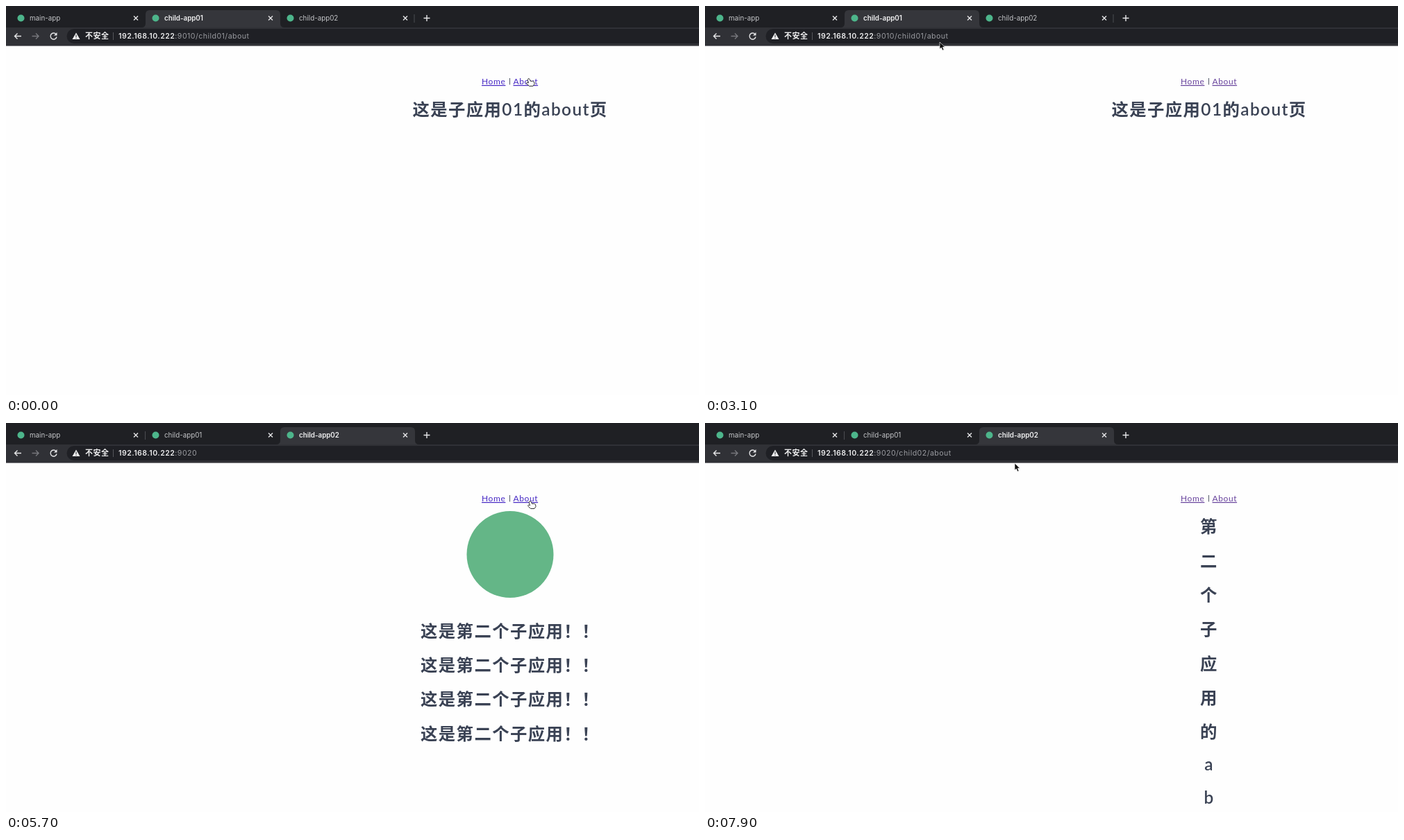
Write an HTML page that moves like this. It is 998 px wide and 561 px high and loops after 8000 ms.

```html
<!DOCTYPE html>
<html lang="zh-CN">
<head>
<meta charset="utf-8">
<title>Child apps</title>
<style>
html, body { margin: 0; width: 100%; height: 100%; overflow: hidden; background: #fefefe; }
svg { display: block; width: 100%; height: 100%; font-family: Inter, "Noto Sans CJK SC", "Noto Sans CJK", sans-serif; }

.title { font-size: 9.8px; fill: #c3c4c7; }
.title.on { fill: #f1f1f2; font-weight: 600; }
.bar { font-size: 10.6px; letter-spacing: .46px; fill: #9a9ba0; }
.bar .host { fill: #eeeeef; font-weight: 600; }
.link, .head { font-family: Lato, "Noto Sans CJK SC", "Noto Sans CJK", sans-serif; }
.link { font-size: 12px; letter-spacing: .6px; text-decoration: underline; }
.head { font-size: 24.4px; letter-spacing: 1.4px; font-weight: 600; fill: #3a4254; text-anchor: middle; }
.line { fill: none; stroke: #e6e6e8; stroke-width: 1.4; }

/* One loop of 8 s; 1.25% is a tenth of a second. */
.show { animation: 8s step-end infinite; visibility: hidden; }
.app1 { animation-name: app1; }
.app2 { animation-name: app2; }
.home1 { animation-name: home1; }
.about1 { animation-name: about1; }
.root2 { animation-name: root2; }
.path2 { animation-name: path2; }
.home2 { animation-name: home2; }
.about2 { animation-name: about2; }
.arrow { animation-name: arrow; }
.hand { animation-name: hand; }
.toHome { animation: toHome 8s step-end infinite; }
.toAbout { animation: toAbout 8s step-end infinite; }
.pointer { animation: move 8s ease-in-out infinite; }

@keyframes app1 { 0% { visibility: visible } 61.25%, 100% { visibility: hidden } }
@keyframes app2 { 0% { visibility: hidden } 61.25%, 100% { visibility: visible } }
@keyframes home1 {
  0%, 22.5%, 61.25%, 100% { visibility: hidden }
  10%, 52.5% { visibility: visible }
}
@keyframes about1 {
  0%, 22.5% { visibility: visible }
  10%, 52.5%, 100% { visibility: hidden }
}
@keyframes root2 { 0%, 73.75%, 100% { visibility: hidden } 61.25% { visibility: visible } }
@keyframes path2 { 0%, 91.25%, 100% { visibility: hidden } 83.75% { visibility: visible } }
@keyframes home2 {
  0%, 73.75%, 91.25%, 100% { visibility: hidden }
  61.25%, 83.75% { visibility: visible }
}
@keyframes about2 {
  0%, 83.75% { visibility: hidden }
  73.75%, 91.25%, 100% { visibility: visible }
}
@keyframes arrow {
  0%, 48.75%, 68.75% { visibility: hidden }
  25%, 54%, 94.5%, 100% { visibility: visible }
}
@keyframes hand {
  0%, 48.75%, 68.75% { visibility: visible }
  25%, 54%, 94.5%, 100% { visibility: hidden }
}
@keyframes toHome { 0%, 61.25% { fill: #4527c4 } 10%, 83.75%, 100% { fill: #67429c } }
@keyframes toAbout { 0%, 61.25% { fill: #4527c4 } 2.5%, 73.75%, 100% { fill: #67429c } }
@keyframes move {
  0%, 2.5% { transform: translate(754px, 105px) }
  8.75%, 17.5% { transform: translate(702px, 111px) }
  21.25%, 23.75% { transform: translate(752px, 109px) }
  28.75% { transform: translate(550px, 98px) }
  33.75%, 41.25% { transform: translate(338px, 52px) }
  49.5%, 53% { transform: translate(706px, 107px) }
  60%, 62.5% { transform: translate(470px, 14px) }
  70%, 75% { transform: translate(756px, 113px) }
  82%, 87.5% { transform: translate(705px, 112px) }
  90.5%, 92.5% { transform: translate(752px, 110px) }
  98.75%, 100% { transform: translate(446px, 58px) }
}
</style>
</head>
<body>
<svg viewBox="0 0 998 561" preserveAspectRatio="none">
  <defs>
    <path id="tab" d="M-6 31Q0 31 0 25V12Q0 6 6 6H188Q194 6 194 12V25Q194 31 200 31Z" fill="#35363b"/>
    <path id="close" class="line" d="M-3-3L3 3M3-3L-3 3"/>
    <circle id="logo" cx="726" cy="189.5" r="62.5" fill="#64b687"/>
  </defs>

  <!-- Browser chrome -->
  <rect width="998" height="31" fill="#1f2024"/>
  <g class="show app1">
    <use href="#tab" x="201"/>
    <path d="M588 12V24" stroke="#4b4c51"/>
    <text class="title on" x="228" y="21">child-app01</text>
    <text class="title" x="422" y="21">child-app02</text>
  </g>
  <g class="show app2">
    <use href="#tab" x="395"/>
    <path d="M200.5 12V24" stroke="#4b4c51"/>
    <text class="title" x="228" y="21">child-app01</text>
    <text class="title on" x="422" y="21">child-app02</text>
  </g>
  <text class="title" x="34" y="21">main-app</text>
  <g fill="#4db58b">
    <circle cx="21.5" cy="17.5" r="5"/>
    <circle cx="215.5" cy="17.5" r="5"/>
    <circle cx="409.5" cy="17.5" r="5"/>
  </g>
  <use href="#close" x="187" y="17.5"/>
  <use href="#close" x="381" y="17.5"/>
  <use href="#close" x="575" y="17.5"/>
  <path class="line" d="M601.5 17.5H610.5M606 13V22"/>

  <rect y="31" width="998" height="26.6" fill="#303136"/>
  <path d="M998 33H98A10.5 10.5 0 0 0 98 54H998Z" fill="#1f2025"/>
  <path class="line" d="M22 43.5H12.5M16.5 39.5L12.5 43.5L16.5 47.5"/>
  <path class="line" d="M37.5 43.5H47M43 39.5L47 43.5L43 47.5" style="stroke:#77787d"/>
  <path class="line" d="M72 40.5A4.5 4.5 0 1 0 73 44.5"/>
  <path d="M73.5 38V42.5H69Z" fill="#e6e6e8"/>
  <path d="M101 38.5L106.5 48H95.5Z" fill="#eeeeef"/>
  <path d="M101 41.5V45M101 46V47" stroke="#1f2025"/>
  <path d="M154.5 38V49" stroke="#55565b"/>
  <g class="bar">
    <text class="host" x="114" y="47.3" font-size="11">不安全</text>
    <text class="show home1" x="162" y="47"><tspan class="host">192.168.10.222</tspan>:9010/child01/</text>
    <text class="show about1" x="162" y="47"><tspan class="host">192.168.10.222</tspan>:9010/child01/about</text>
    <text class="show root2" x="162" y="47"><tspan class="host">192.168.10.222</tspan>:9020</text>
    <text class="show path2" x="162" y="47"><tspan class="host">192.168.10.222</tspan>:9020/child02/</text>
    <text class="show about2" x="162" y="47"><tspan class="host">192.168.10.222</tspan>:9020/child02/about</text>
  </g>

  <!-- Pages -->
  <text class="link toHome" x="685" y="113">Home</text>
  <path d="M725.5 104V113.5" stroke="#555b69"/>
  <text class="link toAbout" x="730.5" y="113">About</text>

  <g class="show home1">
    <use href="#logo"/>
    <text class="head" x="726" y="308.5">这是子应用01</text>
    <rect x="706.5" y="333.5" width="38.5" height="14.5" rx="1.5" fill="#f0f0f0" stroke="#7d7d7d"/>
    <text x="725.7" y="344.3" font-size="10" text-anchor="middle" fill="#222">nihao</text>
  </g>
  <g class="show about1">
    <text class="head" x="726" y="158.3">这是子应用01的about页</text>
  </g>
  <g class="show home2">
    <use href="#logo"/>
    <g class="head">
      <text x="726" y="308.8">这是第二个子应用！！</text>
      <text x="726" y="358.1">这是第二个子应用！！</text>
      <text x="726" y="407.4">这是第二个子应用！！</text>
      <text x="726" y="456.7">这是第二个子应用！！</text>
    </g>
  </g>
  <g class="show about2">
    <g class="head">
      <text x="726" y="158.3">第</text>
      <text x="726" y="207.6">二</text>
      <text x="726" y="256.9">个</text>
      <text x="726" y="306.2">子</text>
      <text x="726" y="355.5">应</text>
      <text x="726" y="404.8">用</text>
      <text x="726" y="454.1">的</text>
      <text x="726" y="501">a</text>
      <text x="726" y="549">b</text>
    </g>
  </g>

  <g class="pointer">
    <path class="show arrow" d="M0 0V10L2.3 8L4 12L6 11.2L4.3 7.3H7.5Z" fill="#111" stroke="#fff" stroke-width=".6"/>
    <path class="show hand" d="M-2 0Q-.8-1 0 .5L1.500 3.500Q5 2.500 6.500 4.500L7 7.500L5 10.500H-.5L-4.500 6.500Q-4.500 5-2.500 5.500L-1.500 6L-2.800 1.500Z" fill="#fff" stroke="#333"/>
  </g>
</svg>
</body>
</html>
```
